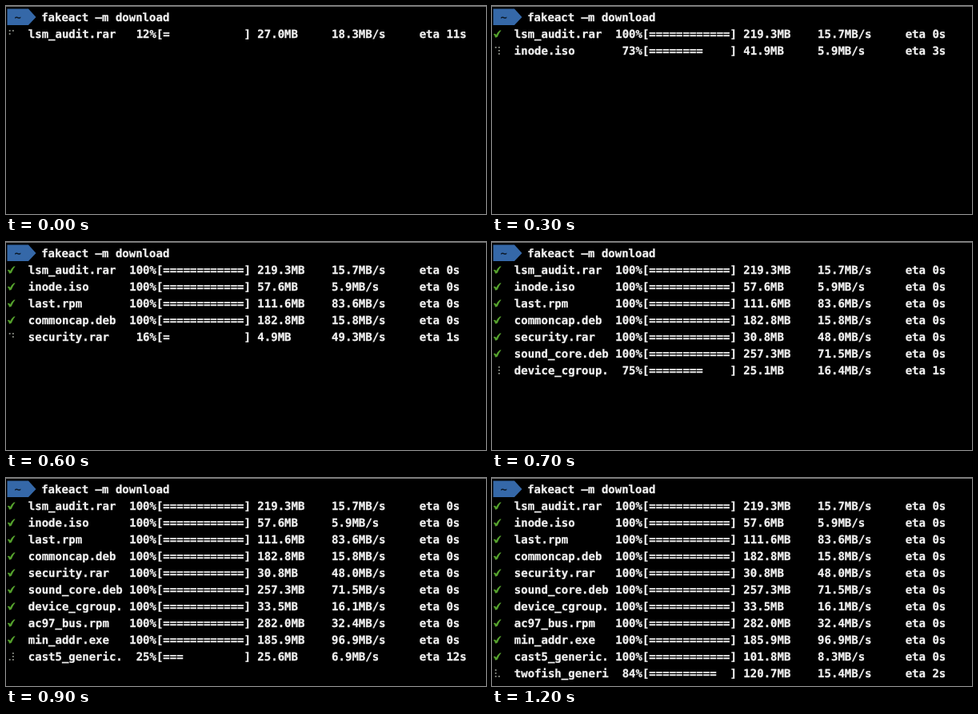
Animation, 600 px wide and 261 px high, one loop 1300 ms. Source, as an HTML page:

```html
<!DOCTYPE html>
<html lang="en">
<head>
<meta charset="utf-8">
<title>Download progress</title>
<style>
  html, body { margin: 0; width: 100%; height: 100%; overflow: hidden; background: #000; }
  svg { display: block; width: 100vw; height: 100vh; }
  text {
    font: bold 14px "DejaVu Sans Mono", "Liberation Mono", monospace;
    fill: #f0f0f0;
    stroke: #f0f0f0;
    stroke-width: .3px;
    white-space: pre;
    text-rendering: geometricPrecision;
  }
  text.home { fill: #0b1826; stroke: none; }
</style>
</head>
<body>
<svg id="stage" viewBox="0 0 600 261">
  <rect width="600" height="261" fill="#000"/>
  <rect width="600" height="1" fill="#707070"/>
  <path d="M1.5 3.5H28L37.5 14L28 24H1.5Z" fill="#3568a8"/>
  <text class="home" x="10.5" y="18.6">~</text>
  <text x="44.2" y="18.6">fakeact –m download</text>
</svg>
<script>
const STEP = 100;
const ROW = 21;
const BAR = 12;

// name, size in MB, final speed in MB/s
const files = [
  ["lsm_audit.rar", 219.3, 15.7],
  ["inode.iso", 57.6, 5.9],
  ["last.rpm", 111.6, 83.6],
  ["commoncap.deb", 182.8, 15.8],
  ["security.rar", 30.8, 48.0],
  ["sound_core.deb", 257.3, 71.5],
  ["device_cgroup.rpm", 33.5, 16.1],
  ["ac97_bus.rpm", 282.0, 32.4],
  ["min_addr.exe", 185.9, 96.9],
  ["cast5_generic.deb", 101.8, 8.3],
  ["twofish_generic.rar", 143.7, 15.4]
];

// active file, MB received, current speed, lit spinner dots
const states = [
  [0, 27.0, 18.3, "124"],
  [0, 119.8, 18.9, "145"],
  [0, 212.5, 19.4, "236"],
  [1, 41.9, 5.9, "1456"],
  [3, 50.6, 13.8, "236"],
  [3, 117.4, 14.6, "1236"],
  [4, 4.9, 49.3, "145"],
  [6, 25.1, 16.4, "456"],
  [7, 193.5, 37.5, "1234"],
  [9, 25.6, 6.9, "3456"],
  [9, 84.0, 6.9, "1456"],
  [10, 44.6, 15.3, "123"],
  [10, 120.7, 15.4, "1236"]
];

const stage = document.getElementById("stage");

function add(parent, tag, attrs) {
  const node = document.createElementNS("http://www.w3.org/2000/svg", tag);
  for (const key in attrs) node.setAttribute(key, attrs[key]);
  return parent.appendChild(node);
}

const rows = files.map((_, i) => {
  const group = add(stage, "g", { transform: `translate(0 ${35 + i * ROW})` });
  const check = add(group, "path", {
    d: "M1.8 .6Q3.6-1.2 5.2 1.2Q7-2.6 9.8-4.6L11.6-4.4Q8.6-.8 6.8 3.8Q5.4 5 4 4.4Q3.4 1.8 1.8 .6Z",
    fill: "#54a02c"
  });
  return { group, check, label: add(group, "text", { x: 27.8, y: 4.6 }) };
});

const spinner = add(stage, "g", { fill: "#8c9088" });
const dots = Array.from({ length: 6 }, (_, i) => add(spinner, "circle", {
  cx: i < 3 ? 4.7 : 8.9, cy: (i % 3 - 1) * 4, r: 1.1
}));

function line([name, total], received, speed) {
  const part = received / total;
  const percent = `${Math.round(part * 100)}%`.padStart(4);
  const bar = "=".repeat(Math.floor(part * BAR)).padEnd(BAR);
  const size = `${received.toFixed(1)}MB`.padEnd(11);
  const rate = `${speed.toFixed(1)}MB/s`.padEnd(13);
  const eta = Math.ceil((total - received) / speed);
  return `${name.slice(0, 14).padEnd(15)}${percent}[${bar}] ${size}${rate}eta ${eta}s`;
}

let shown = -1;

function render(time) {
  const index = Math.floor(time / STEP) % states.length;
  if (index !== shown) {
    shown = index;
    const [active, received, speed, lit] = states[index];
    rows.forEach(({ group, check, label }, i) => {
      const file = files[i];
      const done = i < active;
      group.style.display = i <= active ? "" : "none";
      check.style.display = done ? "" : "none";
      label.textContent = done ? line(file, file[1], file[2]) : line(file, received, speed);
    });
    spinner.setAttribute("transform", `translate(0 ${35 + active * ROW})`);
    dots.forEach((dot, i) => {
      dot.style.display = lit.includes(i + 1) ? "" : "none";
    });
  }
}

const start = performance.now();
function tick() {
  render(performance.now() - start);
  requestAnimationFrame(tick);
}
tick();
</script>
</body>
</html>
```
